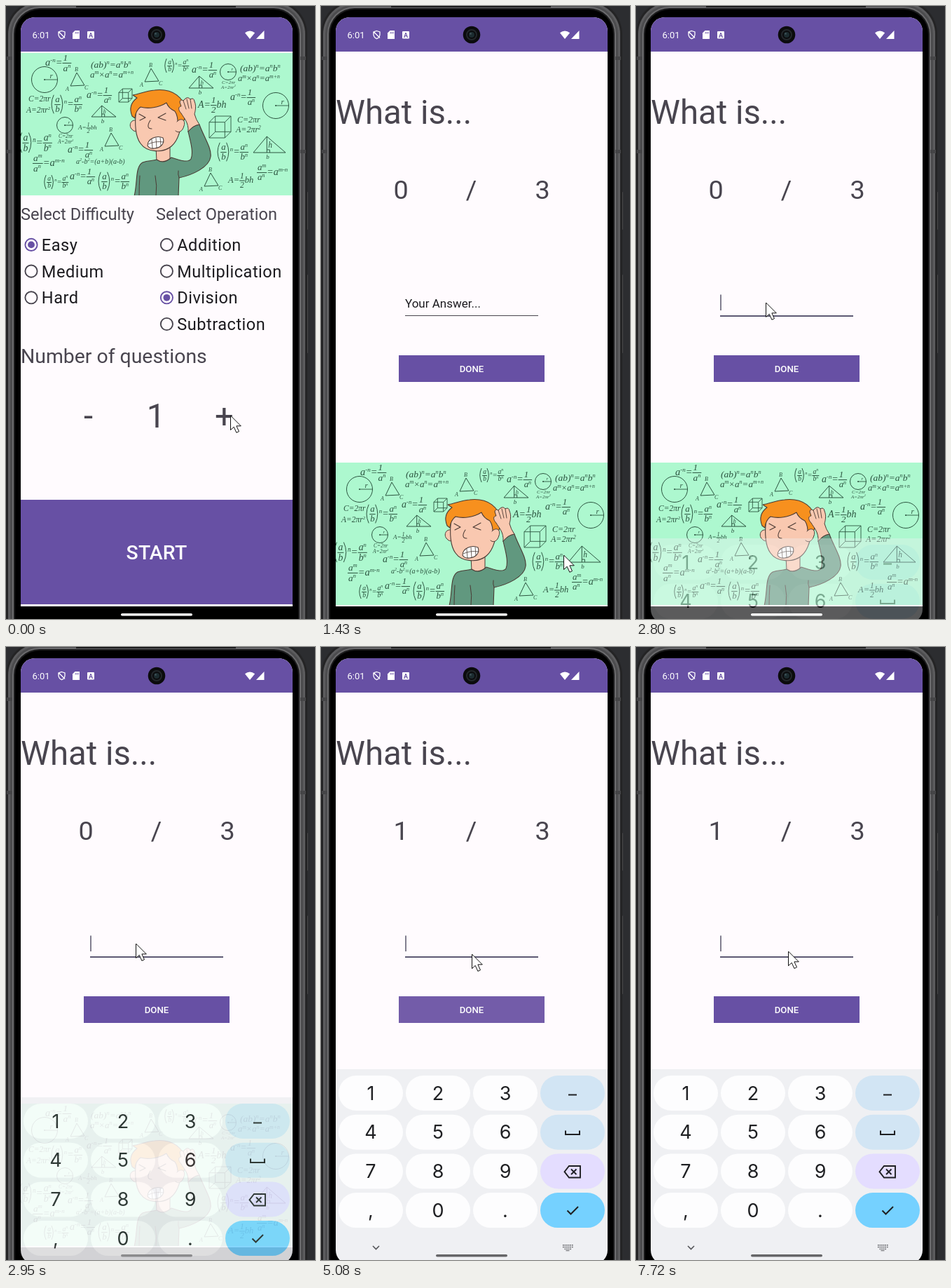
Animation of 441 by 874 pixels, one loop 8 s. Source, as an HTML page with a canvas:

```html
<!DOCTYPE html>
<html lang="en">
<head>
<meta charset="utf-8">
<title>Math quiz</title>
<style>
html, body { margin: 0; width: 100%; height: 100%; overflow: hidden; background: #2c2d30; }
canvas { display: block; width: 441px; height: 874px; }
</style>
</head>
<body>
<canvas id="stage"></canvas>
<script>
const W = 441, H = 874, LOOP = 8000;
const PURPLE = '#6750a4', PAGE = '#fffbfe', INK = '#49454f', DARK = '#1c1b1f', MINT = '#adf8cf';
const stage = document.getElementById('stage');
const ratio = window.devicePixelRatio || 1;
stage.width = W * ratio;
stage.height = H * ratio;
let c = stage.getContext('2d');

// Timelines: [start, ...values], each held until the next entry.
const MOUSE = [
  [0, 320, 583], [150, 320, 584], [1070, 333, 690], [1190, 346, 782],
  [1710, 330, 742], [1870, 286, 634], [2030, 238, 522], [2190, 198, 440], [2340, 185, 422],
  [3190, 181, 520], [3320, 172, 690], [3440, 163, 797], [3850, 192, 645], [4000, 232, 515],
  [5080, 215, 437], [5230, 215, 425], [5500, 217, 433]
];
const COUNT = [[0, '1'], [550, '2'], [950, '3']];
const CARET = [
  [0, 0], [2500, 1], [3320, 0], [3570, 1], [4000, 0], [4390, 1], [5230, 0],
  [5780, 1], [6180, 0], [6730, 1], [7160, 0], [7720, 1]
];
const BUTTON = [[0, PURPLE], [4660, '#7d69b2'], [4810, '#7863ad'], [5080, '#735ca9'], [5230, PURPLE]];
const BOARD = [[0, 270, 0], [2800, 157, 0.36], [2930, 40, 0.88], [3060, 0, 1]];
const HANDLE = [[0, '#fff'], [2930, '#8b8b8d'], [4660, '#666668']];
const QUIZ_AT = 1430, FOCUS_AT = 2500, TYPED_AT = 3570, RELEASED_AT = 3700, NEXT_AT = 4660;

const at = (track, t) => track.filter(k => k[0] <= t).pop().slice(1);

// Paints one part of the stage into its own canvas.
function layer(x, y, w, h, paint) {
  const main = c, canvas = document.createElement('canvas');
  canvas.width = w * ratio;
  canvas.height = h * ratio;
  c = canvas.getContext('2d');
  c.scale(ratio, ratio);
  c.translate(-x, -y);
  paint();
  c = main;
  return canvas;
}
function rect(x, y, w, h, fill) {
  c.fillStyle = fill;
  c.fillRect(x, y, w, h);
}
function round(x, y, w, h, r, fill) {
  c.beginPath();
  c.roundRect(x, y, w, h, r);
  c.fillStyle = fill;
  c.fill();
}
function disc(x, y, r, fill) {
  c.beginPath();
  c.arc(x, y, r, 0, 7);
  c.fillStyle = fill;
  c.fill();
}
function ring(x, y, r, color, width) {
  c.beginPath();
  c.arc(x, y, r, 0, 7);
  c.strokeStyle = color;
  c.lineWidth = width;
  c.stroke();
}
function path(d, fill, line, width = 1) {
  const p = new Path2D(d);
  if (fill) { c.fillStyle = fill; c.fill(p); }
  if (line) { c.strokeStyle = line; c.lineWidth = width; c.stroke(p); }
}
function text(s, x, y, size, color, { align = 'left', weight = 400, family = 'Roboto', space = 0 } = {}) {
  c.font = `${weight} ${size}px ${family}, sans-serif`;
  c.letterSpacing = space + 'px';
  c.textAlign = align;
  c.fillStyle = color;
  c.fillText(s, x, y);
  c.letterSpacing = '0px';
}

// ---------- chalkboard picture ----------
const PEN = '#2c5540';

function glyph(s, x, y, size) {
  c.font = `italic ${size}px "Liberation Serif", serif`;
  c.textAlign = 'left';
  c.fillStyle = PEN;
  c.fillText(s, x, y);
  return c.measureText(s).width;
}
// ^x is a superscript, {a|b} a fraction, [ ] tall brackets.
function formula(s, x, y, size) {
  const start = x;
  for (const [, sup, num, den, ch] of s.matchAll(/\^(.)|\{([^|]*)\|([^}]*)\}|(.)/g)) {
    if (sup) x += glyph(sup, x, y - size * 0.36, size * 0.62);
    else if (num) {
      const mid = y - size * 0.28;
      const w = Math.max(formula(num, x + 1, mid - size * 0.2, size * 0.92),
                         formula(den, x + 1, mid + size * 0.8, size * 0.92)) + 2;
      rect(x, mid, w, 1, PEN);
      x += w;
    } else if (ch === '[' || ch === ']') {
      const w = size * 0.3, h = size * 0.95, m = y - size * 0.28;
      const a = ch === '[' ? x + w : x, b = ch === '[' ? x - w * 0.5 : x + w * 1.5;
      path(`M${a} ${m - h} Q${b} ${m} ${a} ${m + h}`, null, PEN, 1);
      x += w + 1;
    } else x += glyph(ch, x, y, size);
  }
  return x - start;
}
function corners(x, y) {
  path(`M${x} ${y} l-9 19 l20 -1 z`, null, PEN, 1);
  glyph('B', x - 3, y - 2, 8);
  glyph('A', x - 16, y + 26, 8);
  glyph('C', x + 11, y + 24, 8);
}
function tall(x, y, w, h) {
  const m = x + w * 0.42;
  path(`M${x} ${y + h} L${m} ${y} L${x + w} ${y + h} Z M${m} ${y} V${y + h} m0 -4 h4 v4`, null, PEN, 1);
  glyph('h', m + 2, y + h * 0.7, h * 0.5);
  glyph('b', m - 1, y + h + 9, 9);
}
function cube(x, y, s) {
  const f = s * 0.72, d = s - f;
  path(`M${x} ${y + d} h${f} v${f} h${-f} z M${x + d} ${y} h${f} v${f} h${-f} z
    M${x} ${y + d} l${d} ${-d} m${f} 0 l${-d} ${d} m0 ${f} l${d} ${-d} m${-f} 0 l${-d} ${d}`, null, PEN, 0.9);
}
function circle(x, y, r) {
  ring(x, y, r, PEN, 1);
  path(`M${x} ${y} h${r}`, null, PEN, 0.9);
  disc(x, y, 1, PEN);
  glyph('r', x + r * 0.4, y - 2, r * 0.6);
}

const POWER = 'a^-^n={1|a^n}', RATIO = '[{a|b}]^n={a^n|b^n}', PRODUCT = '(ab)^n=a^nb^n';
const SUM = 'a^m×a^n=a^m^+^n', QUOTIENT = '{a^m|a^n}=a^m^-^n', AREA = 'A={1|2}bh';
const ROUND = 'C=2πr', DISC = 'A=2πr^2';
const FORMULAS = [
  [POWER, 56, 85, 14.5], [PRODUCT, 121, 88, 13.5], [SUM, 120, 102, 13], [ROUND, 32, 136, 11.5], [DISC, 29, 152, 11.5],
  [RATIO, 64, 144, 14], [POWER, 115, 131, 14], [ROUND, 75, 188, 7.5], [DISC, 74, 196, 7.5], [AREA, 103, 176, 9],
  [RATIO, 18, 199, 15], [QUOTIENT, 38, 228, 14.5], [POWER, 88, 209, 14], ['a^2-b^2=(a+b)(a-b)', 100, 225, 10],
  [RATIO, 54, 254, 10.5], [POWER, 91, 247, 14], [RATIO, 131, 254, 14],
  [RATIO, 226, 88, 10.5], [POWER, 265, 95, 14], [ROUND, 308, 111, 7], [DISC, 307, 118, 7],
  [PRODUCT, 334, 93, 13.5], [SUM, 331, 107, 12.5], [AREA, 274, 145, 14], [POWER, 320, 134, 14],
  [ROUND, 330, 166, 12], [DISC, 328, 180, 12], [RATIO, 301, 212, 14], [AREA, 317, 252, 12.5], [QUOTIENT, 358, 241, 14]
];

function boy() {
  const line = '#4a3a34', skin = '#f9c8b0', hair = '#f7901e', wool = '#61987f';
  c.lineJoin = c.lineCap = 'round';
  path('M214 200 L215 221 Q224 228 234 219 L234 196 Z', skin, line, 1);
  path(`M183 271 C188 252 184 229 195 223 C203 220 210 221 215 219 Q225 226 236 216
    C248 220 260 224 264 218 C268 208 263 192 260 179 Q267 170 276 169
    C281 184 294 203 292 215 C290 230 266 241 247 245 L246 271 Z`, wool, line, 1.1);
  path('M213 242 Q216 256 214 271 M247 245 Q245 240 246 235 M191 242 Q190 256 190 271', null, line, 1);
  path('M189 164 C178 159 174 171 180 176 Q184 181 190 177 Z', skin, line, 1);
  path(`M186 146 C184 162 183 184 192 196 C201 209 224 210 236 200
    C247 191 251 172 252 150 C240 128 200 128 186 146 Z`, skin, line, 1.1);
  path(`M180 157 C175 145 179 137 187 131 L181 127 C190 126 199 121 212 120
    C238 117 256 131 256 151 C256 160 253 167 250 174 L245 171 Q246 157 241 150
    Q232 146 229 138 C218 145 203 147 192 144 Q185 149 184 160 Z`, hair, line, 1.1);
  path('M244 165 C250 158 257 163 254 171 C252 179 246 182 242 178', skin, line, 1);
  path(`M260 179 C261 166 254 160 250 153 C245 148 246 143 250 143 L248 137 Q249 132 253 135
    L256 132 Q260 129 263 133 Q268 130 269 136 C272 143 270 150 269 154 Q271 162 276 169 Q267 170 260 179 Z`,
    skin, line, 1);
  path('M253 135 L257 147 M258 133 L261 146 M263 133 L265 146', null, line, 0.9);
  path('M190 154 L199 159 L191 163 M228 153 L217 159 L228 163', null, line, 1.1);
  path('M206 163 C202 169 201 175 208 175', null, line, 1.1);
  path('M202 199 C202 189 215 184 224 188 C227 196 221 202 212 203 Q205 204 202 199 Z', '#fff', line, 1.1);
  path('M203 197 Q213 192 225 194 M208 190 L209 203 M214 188 L215 202 M220 187 L221 199', null, line, 0.8);
}

const art = layer(21, 67, 388, 203, () => {
  rect(21, 67, 388, 203, MINT);
  FORMULAS.forEach(f => formula(...f));
  [[101, 95], [207, 89], [150, 181], [292, 238]].forEach(p => corners(...p));
  [[122, 142, 35, 16], [261, 100, 35, 17], [353, 186, 46, 23]].forEach(p => tall(...p));
  [[55, 105, 18.5], [84, 170, 11.5], [317, 94, 11.5], [385, 142, 18.5]].forEach(p => circle(...p));
  cube(161, 118, 19);
  cube(290, 157, 31);
  boy();
});

// ---------- phone ----------
function phone() {
  rect(0, 0, W, H, '#2c2d30');
  round(427, 265, 4, 54, 1, '#4a4a4c');
  round(427, 383, 4, 112, 1, '#4a4a4c');
  [[0, '#242425'], [3, '#5c5c5e'], [6, '#4c4c4e'], [9, '#6c6c6e'], [11, '#1c1c1d'], [13, '#000']].forEach(([d, fill]) =>
    round(d, d - 8, 430 - 2 * d, 940, 48 - d, fill));
  rect(100, 0, 228, 2, '#1b1b1c');
  for (const x of [1, 420]) for (const y of [72, 205]) rect(x, y, 8, 5, '#454547');
}
function statusBar() {
  rect(21, 16, 388, 49, PURPLE);
  text('6:01', 37.5, 46, 13, '#fff');
  path('M79.5 35.5 L84 37 V41 Q83.5 45 79.5 46.7 Q75.5 45 75 41 V37 Z M75.5 37 L84 45.5', null, '#fff', 1.3);
  path('M98.5 35 H105 V47 H95 V38.5 Z', '#fff');
  path('M99.2 37 v2.5 M101.2 37 v2.5 M103.2 37 v2.5', null, PURPLE, 0.9);
  round(116, 36, 10, 10.5, 1, '#fff');
  text('A', 121, 44.7, 9, PURPLE, { align: 'center', weight: 700 });
  path('M341 38.3 Q348 32.7 355.2 38.3 L348 47 Z', '#fff');
  path('M357 47 L368.5 35 V47 Z', '#fff');
  disc(215, 41, 12.3, '#0b0b0d');
  ring(215, 41, 7, '#22272b', 2);
  disc(215, 41, 4, '#1c2c30');
  disc(213.5, 39.5, 1.3, '#40545a');
}
function radio(label, x, row, on) {
  const y = 340.4 + row * 37.7;
  ring(x, y, 8.6, on ? PURPLE : INK, 1.9);
  if (on) disc(x, y, 4.9, PURPLE);
  text(label, x + 14.8, y + 8.6, 23.6, DARK, { space: 0.5 });
}
function picture(y) {
  c.drawImage(art, 21, y, 388, 203);
}
function setupPage(t) {
  const mid = { align: 'center' };
  picture(67);
  text('Select Difficulty', 21, 305, 23.6, INK);
  text('Select Operation', 214, 305, 23.6, INK);
  ['Easy', 'Medium', 'Hard'].forEach((s, i) => radio(s, 36, i, i === 0));
  ['Addition', 'Multiplication', 'Division', 'Subtraction'].forEach((s, i) => radio(s, 229.4, i, i === 2));
  text('Number of questions', 21, 509, 28.4, INK);
  text('-', 117.5, 601, 47.3, INK, mid);
  text(at(COUNT, t)[0], 214, 601, 47.3, INK, mid);
  text('+', 311.5, 601, 47.3, INK, mid);
  rect(21, 704, 388, 149, PURPLE);
  text('START', 215, 789, 28.4, '#fff', { align: 'center', weight: 500, space: 0.2 });
}
function quizPage(t) {
  const mid = { align: 'center' };
  const focused = t >= FOCUS_AT, typed = t >= TYPED_AT && t < NEXT_AT;
  text('What is...', 21, 168, 47.3, INK);
  text(t < NEXT_AT ? '0' : '1', 114, 274.5, 37.8, INK, mid);
  text('/', 214.5, 274.5, 37.8, INK, mid);
  text('3', 316, 274.5, 37.8, INK, mid);
  if (!focused) text('Your Answer...', 120, 429.6, 17, DARK);
  if (typed) text('0', 120, 429.6, 17, DARK);
  if (at(CARET, t)[0]) rect(typed ? 129.5 : 120.3, 411.5, 1.4, 22.5, '#4d4a62');
  rect(120, 441, 190, focused ? 2 : 1, focused ? '#5d5973' : '#48454d');
  rect(111, 498, 208, 38, at(BUTTON, t)[0]);
  text('DONE', 215, 522, 13.2, '#fff', { align: 'center', weight: 500 });
  picture(651);
}

// ---------- keyboard ----------
const COLS = [25, 121, 217, 313];
const rowY = i => 611 + i * 55.7;

function keyboard(pressed) {
  const ink = '#1f2023';
  rect(21, 602, 388, 280, '#eff0f3');
  ['123', '456', '789', ',0.'].forEach((row, r) => [...row].forEach((k, i) => {
    round(COLS[i], rowY(r), 92, 50, 25, k === pressed ? '#dcdde1' : '#fdfdfe');
    text(k, COLS[i] + 46, rowY(r) + 34.5, 27, ink, { align: 'center', family: 'Inter' });
  }));
  ['#d2e5f4', '#d2e5f4', '#e4ddff', '#75d1ff'].forEach((fill, r) => round(313, rowY(r), 92, 50, 25, fill));
  path('M353 638.5 H365', null, ink, 2);
  path('M349 689.5 V695 H369 V689.5', null, ink, 2);
  path('M354 740 H370 V756.5 H354 L347.5 748.2 Z M357 744.5 l7.5 7.5 m0 -7.5 l-7.5 7.5', null, ink, 1.9);
  path('M351.5 803.5 L356.5 808.5 L367 798', null, ink, 2);
  path('M74 854 L78.5 858.5 L83 854', null, '#55565a', 1.6);
  for (let r = 0; r < 3; r++) for (let i = 0; i < 6; i++)
    if (r < 2 || (i > 0 && i < 5)) rect(345 + i * 2.6, 852 + r * 2.8, 1.6, 1.6, '#606165');
  rect(349.5, 860.2, 5, 1, '#606165');
}
const [keys, keysPressed] = ['', '0'].map(k => layer(21, 602, 388, 280, () => keyboard(k)));

function pointer(x, y) {
  c.save();
  c.translate(x + 0.5, y + 1);
  path('M0 0 V20.5 L4.7 16.2 L8.4 24.3 L12 22.6 L8.4 14.8 H14.8 Z', '#fff', '#111', 1);
  c.restore();
}

function draw(t) {
  c.setTransform(ratio, 0, 0, ratio, 0, 0);
  phone();
  c.save();
  c.beginPath();
  c.roundRect(21, 16, 388, 864, 20);
  c.clip();
  rect(21, 16, 388, 840, PAGE);
  statusBar();
  if (t < QUIZ_AT) setupPage(t);
  else quizPage(t);
  rect(21, 856, 388, 24, '#000');
  const [drop, alpha] = at(BOARD, t);
  c.globalAlpha = alpha;
  c.drawImage(t >= TYPED_AT && t < RELEASED_AT ? keysPressed : keys, 21, 602 + drop, 388, 280);
  c.globalAlpha = 1;
  round(164, 866, 102, 3.6, 1.8, at(HANDLE, t)[0]);
  c.restore();
  pointer(...at(MOUSE, t));
}

function tick() {
  draw(performance.now() % LOOP);
  requestAnimationFrame(tick);
}
tick();
</script>
</body>
</html>
```
